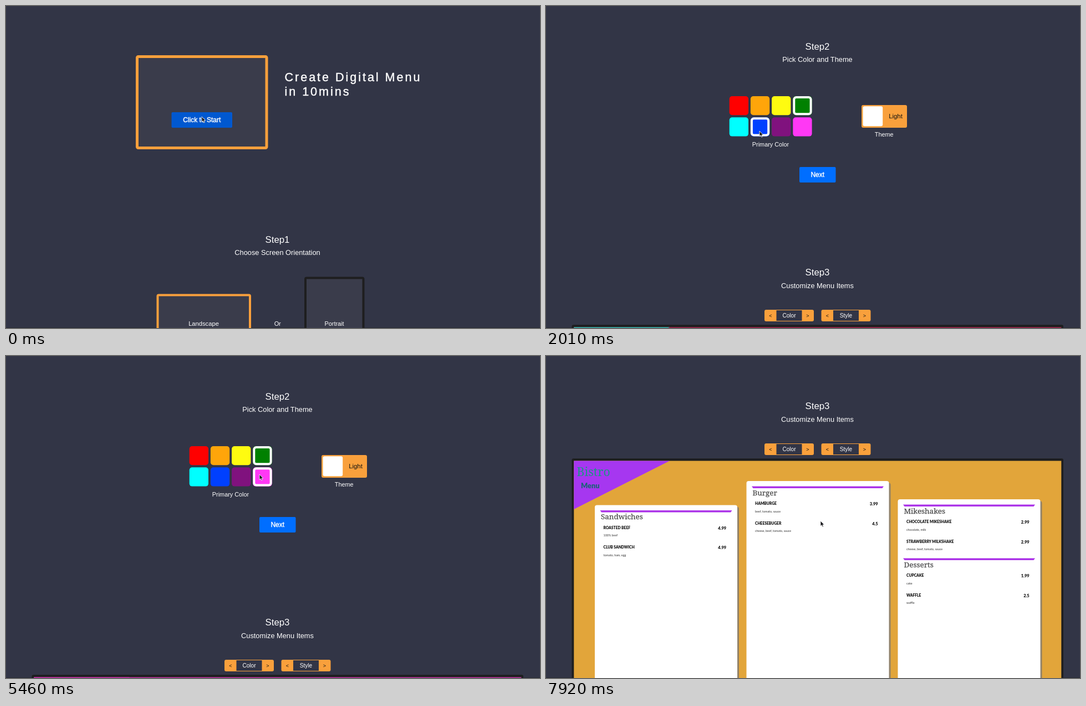
These frames come from a looping animation (963x582 px, 8000 ms). An HTML page:

```html
<!DOCTYPE html>
<html lang="en">
<head>
<meta charset="utf-8">
<title>Digital menu builder</title>
<style>
  html, body { margin: 0; width: 100%; height: 100%; overflow: hidden; background: #323546; }
  svg { display: block; width: 963px; height: 582px; }
  text { font-family: "Liberation Sans", Arial, sans-serif; white-space: pre; }
  .slab { font-family: "Noto Serif", serif; }
  .dish { font-family: Lato, sans-serif; }
  .medium { stroke: currentColor; stroke-width: .4px; color: #fff; }
</style>
</head>
<body>
<svg id="stage" viewBox="0 0 963 582"></svg>
<script>
const LOOP = 8000;
const ORANGE = '#f9a03c', PANEL = '#3a3c4b', BLACK = '#1e1e1f';
const stage = document.getElementById('stage');

function add(parent, tag, attrs, content) {
  const node = document.createElementNS('http://www.w3.org/2000/svg', tag);
  for (const key in attrs) node.setAttribute(key, attrs[key]);
  if (content) node.textContent = content;
  return parent.appendChild(node);
}
const rect = (x, y, width, height, fill, rx = 0, more = {}) =>
  add(page, 'rect', { x, y, width, height, fill, rx, ...more });

// y is the middle of the capitals
const label = (content, x, y, size, more = {}) =>
  add(page, 'text', { x, y: y + size * .36, 'font-size': size, fill: '#fff', 'text-anchor': 'middle', ...more }, content);

const outlined = (x, y, w, h, line, stroke) =>
  rect(x + line / 2, y + line / 2, w - line, h - line, PANEL, 2, { stroke, 'stroke-width': line });

function button(content, x, y, w, h) {
  const box = rect(x, y, w, h, '#006eff', 2);
  label(content, x + w / 2, y + h / 2 - .5, 12, { class: 'medium' });
  return { box, x, y, w, h };
}
function heading(number, subtitle, y) {
  label('Step' + number, 489.5, y, 16.8);
  label(subtitle, 489.5, y + 24, 12.8);
}

add(stage, 'rect', { width: 963, height: 582, fill: '#323546' });
add(stage, 'rect', { y: 581, width: 963, height: 1, fill: '#272934' });
const page = add(stage, 'g', {});

// Welcome
outlined(234, 89, 238.5, 170, 5, ORANGE);
const buttons = [button('Click to Start', 298.5, 192, 109.5, 28)];
['Create Digital Menu', 'in 10mins'].forEach((line, i) =>
  label(line, 502.5, 128.7 + i * 25.7, 21.6, { 'text-anchor': 'start', 'letter-spacing': 2.95, class: 'medium' }));

// Step 1
heading(1, 'Choose Screen Orientation', 421.5);
outlined(271.5, 520.5, 170.5, 109, 4, ORANGE);
outlined(538, 489.5, 108.5, 170.5, 4, BLACK);
label('Landscape', 356.5, 574.3, 11.2);
label('Or', 489.7, 574.3, 10.9);
label('Portrait', 592, 574.3, 10.85);

// Step 2
heading(2, 'Pick Color and Theme', 822.5);
const swatches = ['#f00', '#ffa50a', '#fffb10', '#008000', '#0ff', '#0040ff', '#80127e', '#ff38f5'].map((fill, i) => {
  const x = 330.7 + i % 4 * 38.2, y = 913 + (i >> 2) * 38.3;
  rect(x, y, 34.3, 34.3, fill, 5);
  const ring = rect(x + 2, y + 2, 30.3, 30.3, 'none', 4, { stroke: '#fff', 'stroke-width': 4 });
  return { ring, x, y, w: 34.3, h: 34.3 };
});
label('Primary Color', 405, 1000.3, 10.85);
const toggle = { x: 569, y: 929, w: 82, h: 41 };
rect(569, 929, 82, 41, ORANGE, 3);
const shade = rect(569, 929, 82, 41, '#222', 3);
const themeName = label('Light', 630.5, 949, 11.4, { fill: '#111' });
const knob = rect(571.5, 931.3, 35.7, 36, '#fff', 3);
label('Theme', 609.7, 982.3, 10.85);
buttons.push(button('Next', 457, 1041, 65.5, 28));

// Step 3
heading(3, 'Customize Menu Items', 1231);
[['Color', 394], ['Style', 496.5]].forEach(([name, x]) => {
  rect(x, 1299, 89, 21, ORANGE, 3);
  rect(x + 21.5, 1300, 46, 19, '#323546');
  label(name, x + 44.5, 1309.5, 10.1);
  label('<', x + 11, 1309.5, 9, { fill: '#111' });
  label('>', x + 78, 1309.5, 9, { fill: '#111' });
});

rect(46.5, 1326.3, 886.5, 700, BLACK, 3);
const board = rect(50.3, 1330.5, 879, 700, '#e2a53a');
const corner = add(page, 'path', { d: 'M50.3 1330.5H223L50.3 1418Z' });
label('Bistro', 55.5, 1350, 21.3, { class: 'slab', 'text-anchor': 'start', fill: '#1c9583' });
label('Menu', 63, 1375.5, 12.8, { class: 'dish', 'font-weight': 900, 'text-anchor': 'start', fill: '#1b6277' });

function section(x, y, title, dishes) {
  add(page, 'path', { d: `M${x + 9.5} ${y + 9.5}h238l-2.5 3.5h-233Z`, fill: '#ac34e8' });
  label(title, x + 11, y + 21, 13.4, { class: 'slab', 'text-anchor': 'start', fill: '#4a4a4a', stroke: '#4a4a4a', 'stroke-width': .25 });
  dishes.forEach(([name, price, parts], i) => {
    const top = y + 40.7 + i * 35.4;
    const bold = { class: 'dish', 'font-weight': 900, fill: '#111' };
    label(name, x + 15.5, top, 6.7, { ...bold, 'text-anchor': 'start' });
    label(price, x + 237, top + 1, 7.4, { ...bold, 'text-anchor': 'end' });
    label(parts, x + 15.5, top + 14.3, 5.4, { class: 'dish', 'text-anchor': 'start', fill: '#333' });
  });
}
function card(x, y, ...sections) {
  rect(x + 3, y + 3, 257, 600, '#777', 4, { opacity: .75 });
  rect(x, y, 257, 600, '#fff', 4);
  sections.forEach(([title, dishes], i) => section(x, y + i * 97, title, dishes));
}
card(88, 1410.5, ['Sandwiches', [
  ['ROASTED BEEF', '4.99', '100% beef'],
  ['CLUB SANDWICH', '4.99', 'tomato, ham, egg']]]);
card(361.5, 1367, ['Burger', [
  ['HAMBURGE', '3.99', 'beef, tomato, sauce'],
  ['CHEESEBUGER', '4.5', 'cheese, beef, tomato, sauce']]]);
card(634.5, 1400, ['Mikeshakes', [
  ['CHOCOLATE MIKESHAKE', '2.99', 'chocolate, milk'],
  ['STRAWBERRY MILKSHAKE', '2.99', 'cheese, beef, tomato, sauce']]],
  ['Desserts', [
  ['CUPCAKE', '1.99', 'cake'],
  ['WAFFLE', '2.5', 'waffle']]]);

// Pointers
const pointer = add(stage, 'g', { 'stroke-linejoin': 'round' });
const arrow = add(pointer, 'path', {
  d: 'M0 0V9.6L2.2 7.6L3.7 11L5.4 10.3L3.9 7H6.8Z', fill: '#16161a', stroke: '#fff', 'stroke-width': .8 });
const hand = add(pointer, 'path', {
  d: 'M-1 0Q0-1.5 1 0V3.5L4.2 4.2Q5.4 4.5 5.2 6L4.4 10H-.6L-3.4 6Q-3.6 4.8-2.4 5.2L-1 6.2Z',
  fill: '#fff', stroke: '#222', 'stroke-width': .8 });

// Moves: first step, last step, number of steps, target values
const SCROLL = [[250, 650, 6, 349], [1300, 1700, 6, 750], [7600, 8000, 6, 1164]];
const POINTER = [
  [730, 890, 3, 388, 233], [1780, 2010, 4, 385, 226], [2170, 2410, 4, 468, 182],
  [3070, 3620, 8, 630, 209], [4740, 5460, 10, 457, 214], [5620, 6090, 7, 380, 180],
  [6650, 7120, 7, 495, 288], [7200, 7360, 3, 495, 298]];
const DARK = [[3860, 4260, 6, 1], [4340, 4660, 5, 0]];
const THEMES = [[0, '#2bb9b0', '#a3264f'], [2910, '#c034a4', '#c034a4'], [6410, '#a637f0', '#e2a53a']];

const ease = p => p < .5 ? 2 * p * p : 1 - 2 * (1 - p) ** 2;

function follow(value, moves, t) {
  for (const [first, last, count, ...target] of moves) {
    if (t < first) break;
    const step = (last - first) / (count - 1);
    const e = ease(Math.min(count, Math.floor((t - first) / step + .01) + 1) / count);
    value = value.map((v, i) => v + (target[i] - v) * e);
  }
  return value;
}

function render(t) {
  const [scroll] = follow([0], SCROLL, t);
  const [x, y] = follow([353, 200], POINTER, t);
  const [dark] = follow([0], DARK, t);
  const over = b => x >= b.x && x <= b.x + b.w && y + scroll >= b.y && y + scroll <= b.y + b.h;

  page.setAttribute('transform', `translate(0 ${-scroll})`);
  pointer.setAttribute('transform', `translate(${x} ${y})`);
  const grab = over(toggle);
  arrow.setAttribute('opacity', grab ? 0 : 1);
  hand.setAttribute('opacity', grab ? 1 : 0);

  for (const b of buttons) b.box.setAttribute('fill', over(b) ? '#0058d0' : '#006eff');
  const chosen = t < 6410 ? 3 : 1;
  swatches.forEach((s, i) => s.ring.setAttribute('opacity', i === chosen || over(s) ? 1 : 0));

  const isDark = t >= 3860 && t < 4340;
  shade.setAttribute('opacity', dark);
  knob.setAttribute('x', 571.5 + 41.3 * dark);
  themeName.textContent = isDark ? 'Dark' : 'Light';
  themeName.setAttribute('x', isDark ? 589.5 : 630.5);
  themeName.setAttribute('fill', isDark ? '#fff' : '#111');

  const [, tip, ground] = THEMES.filter(([from]) => t >= from).pop();
  corner.setAttribute('fill', tip);
  board.setAttribute('fill', ground);
}

const start = performance.now();
function tick() {
  render((performance.now() - start) % LOOP);
  requestAnimationFrame(tick);
}
tick();
</script>
</body>
</html>
```
